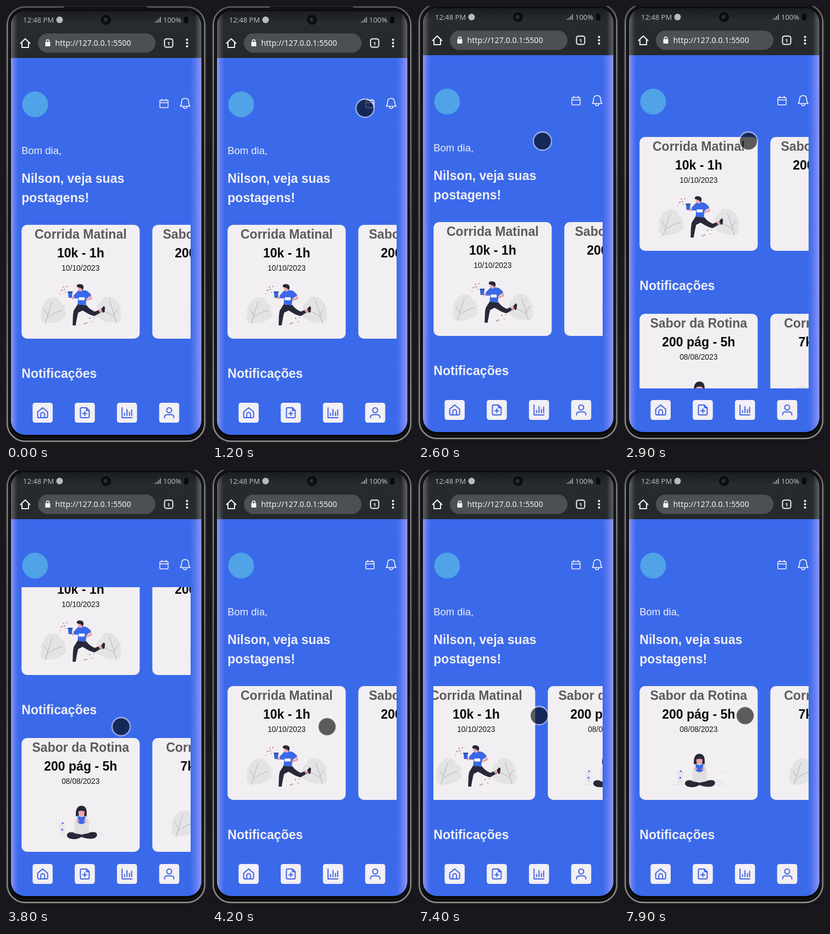
An HTML page for the animation above (8 s loop, 364 by 789 pixels).

```html
<!DOCTYPE html>
<html lang="pt-BR">
<head>
<meta charset="utf-8">
<title>Postagens</title>
<style>
html, body { margin: 0; width: 100%; height: 100%; overflow: hidden; background: #17161c; }
svg { display: block; width: 100vw; height: 100vh; }
text { font-family: "Liberation Sans", Arial, sans-serif; fill: #f2eff2; }
.hi { font-size: 18.45px; }
.big { font-size: 23.05px; font-weight: 700; }
.mid { text-anchor: middle; }
.card .big { fill: #0a0a0a; }
.card .name { fill: #5d5a5c; }
.date { font-size: 13.85px; fill: #161616; }
.ui { font-family: "Noto Sans", "Open Sans", sans-serif; }
.status { font-size: 13px; fill: #b8bbbd; }
.url { font-size: 14.15px; fill: #f4f4f4; }
.line { fill: none; stroke: #f4f1fa; stroke-width: 1.6; stroke-linecap: round; stroke-linejoin: round; }
.nav .line { stroke: #4263e4; stroke-width: 2; }

/* one loop is 8 s, drawn in 100 ms ticks: 1.25% each */
#phone, #page, #row, #touch { animation: 8s step-end infinite; }
#phone { animation-name: drift; }
#page { animation-name: scroll; }
#row { animation-name: swipe; }
#touch { animation-name: touch; }

@keyframes drift {
  0% { transform: translateY(0); }
  27.5% { transform: translateY(-2px); }
  28.75%, 100% { transform: translateY(-5px); }
}
@keyframes scroll {
  0% { transform: translateY(0); }
  35% { transform: translateY(-72px); }
  36.25% { transform: translateY(-154px); }
  37.5% { transform: translateY(-205px); }
  38.75% { transform: translateY(-226px); }
  50% { transform: translateY(-150px); }
  51.25% { transform: translateY(-45px); }
  52.5%, 100% { transform: translateY(0); }
}
@keyframes swipe {
  0% { transform: translateX(0); }
  92.5% { transform: translateX(-30px); }
  93.75% { transform: translateX(-110px); }
  95% { transform: translateX(-185px); }
  96.25% { transform: translateX(-228px); }
  98.75%, 100% { transform: translateX(-238px); }
}
@keyframes touch {
  0% { opacity: 0; transform: translate(61.5px, 46.5px); }
  6.25% { opacity: 1; transform: translate(61.5px, 46.5px); }
  7.5% { opacity: 1; transform: translate(61.5px, 46.5px); animation-timing-function: steps(3, end); }
  11.25% { transform: translate(57.5px, 178px); }
  12.5% { transform: translate(125px, 197px); animation-timing-function: steps(2, end); }
  15% { transform: translate(278.5px, 185px); animation-timing-function: steps(2, end); }
  17.5% { transform: translate(57.5px, 178px); }
  20% { transform: translate(110px, 190px); }
  21.25% { transform: translate(210px, 195px); }
  22.5% { transform: translate(278.5px, 185px); }
  23.75% { transform: translate(230.5px, 193.5px); }
  31.25% { transform: translate(229px, 215px); }
  32.5% { transform: translate(226.5px, 244.5px); }
  36.25% { transform: translate(226.5px, 244.5px); animation-timing-function: steps(7, end); }
  45% { transform: translate(225.5px, 473.5px); }
  47.5% { transform: translate(209.5px, 464.5px); }
  67.5% { transform: translate(222.5px, 435.5px); }
  71.25% { transform: translate(222px, 436px); }
  72.5% { transform: translate(223px, 436.5px); }
  77.5% { transform: translate(221.5px, 446.5px); }
  92.5%, 100% { opacity: 1; transform: translate(220.5px, 444.5px); }
}
</style>
</head>
<body>
<svg viewBox="0 0 364 789" preserveAspectRatio="none">
<defs>
  <linearGradient id="glow">
    <stop offset="0" stop-color="#cdb8ff" stop-opacity=".62"/>
    <stop offset=".35" stop-color="#b5a4ff" stop-opacity=".42"/>
    <stop offset="1" stop-color="#8f8cff" stop-opacity="0"/>
  </linearGradient>
  <linearGradient id="gloss">
    <stop offset="0" stop-color="#b9b9bd" stop-opacity=".4"/>
    <stop offset="1" stop-color="#b9b9bd" stop-opacity="0"/>
  </linearGradient>
  <linearGradient id="bar" x2="0" y2="1">
    <stop offset="0" stop-color="#1b1d1f"/>
    <stop offset=".25" stop-color="#272b2e"/>
    <stop offset="1" stop-color="#24292c"/>
  </linearGradient>
  <linearGradient id="rim" x2="0" y2="1">
    <stop offset="0" stop-color="#58585a"/>
    <stop offset=".05" stop-color="#7c7c7a"/>
    <stop offset=".5" stop-color="#62625f"/>
    <stop offset=".96" stop-color="#83837f"/>
    <stop offset="1" stop-color="#8d8d89"/>
  </linearGradient>
  <clipPath id="screen"><rect x="9" y="9" width="346.5" height="767" rx="26"/></clipPath>
  <clipPath id="view"><rect x="28" y="217.5" width="307.5" height="479"/></clipPath>

  <g id="leaf">
    <path fill="#e4e3e4" d="M4 46C-1 42 0 34 3 30C-2 24 4 18 6 13C10 6 18-1 26 1C33 0 35 7 38 12C46 14 46 22 45 26C50 32 46 39 40 41C30 48 14 50 4 46Z"/>
    <path fill="none" stroke="#a3a2a8" stroke-width=".8" d="M9 49C13 36 17 22 22 9M14 34L7 23M13 38C21 32 29 27 40 25"/>
  </g>

  <g id="runner">
    <use href="#leaf" x="34" y="130"/>
    <use href="#leaf" transform="translate(182 129) scale(-1 1)"/>
    <path fill="#272838" d="M102 144L118 145C121 150 127 154 133 157L144 153L147 157L133 165C126 164 118 159 111 155L103 159C101 167 99.500 175 98.500 182L93 182C93.500 172 93 163 95 155Z"/>
    <path fill="#e9a6ad" d="M140 154.500L144.500 152L147 156L142.500 159Z"/>
    <path fill="#272838" d="M145 152L149.500 147L152 149.500L151 158L148 159Z"/>
    <path fill="none" stroke="#e9a6ad" stroke-width="3.500" stroke-linecap="round" stroke-linejoin="round" d="M99 127L93 133L89 128M123 124L127 133L119 136"/>
    <path fill="#3a68e8" d="M102 120C107 117 115 118 120 120L127 127L122 131L118 134L117 146L102 144L103 133L96 133L94.500 128Z"/>
    <rect x="104" y="131" width="11" height="5.500" rx="1" fill="#f2eff2"/>
    <path fill="#3562e0" d="M84.500 122H92.500L91.500 132H85.500Z"/>
    <path fill="#27468f" d="M84 120.500h9v2h-9z"/>
    <path fill="#e9a6ad" d="M102.500 112H111V119Q107 122 104 119Q102 117 102.500 112Z"/>
    <path fill="#262737" d="M100.500 112C100 107 105 107 108 107.500C114 108 114 115 111 118C109 113 104 114 100.500 112Z"/>
    <g fill="#d98d9d">
      <path d="M71 118l4-1v2l-4 1zM75 112l3-1v2l-3 1zM82 110l2 1-1 2-2-1zM117 176l3 1-1 2-3-1zM128 174l2 2-1 1-2-2z"/>
      <circle cx="70" cy="125" r="1"/><circle cx="131" cy="168" r="1"/>
    </g>
    <g fill="#4c4a7c">
      <circle cx="78" cy="117" r=".9"/><circle cx="80" cy="122" r=".8"/>
      <circle cx="124" cy="169" r=".9"/><circle cx="115" cy="179" r=".9"/>
    </g>
  </g>

  <g id="reader">
    <path stroke="#dddadd" stroke-width=".8" d="M59 178H157"/>
    <path fill="#e9e6e9" d="M67 154h12v22H70zM139 170l4-2 9 9h-4zM146 154h9v2h-9z"/>
    <circle cx="75" cy="154" r="1.8" fill="#7b66e8"/><circle cx="74" cy="166" r="1.8" fill="#5c62e8"/>
    <path fill="#272838" d="M85 172C88 169 98 171 109 175C121 171 132 169 135 171C140 174 137 181 130 182C121 183 114 181 109 179C103 183 96 184 88 182C82 180 81 174 85 172Z"/>
    <path fill="#e2dfe1" d="M102 141C106 138 114 138 118 141C123 147 124 157 122 164L123 172Q109 176 95 172L97 164C95 156 97 147 102 141Z"/>
    <path fill="#262737" d="M99 142C98 132 100 123 109 122.500C119 123 119 132 118.500 142Q109 137 99 142Z"/>
    <path fill="#e9a6ad" d="M103 132Q109 126 115 132L114 139Q109 144 104 139Z"/>
    <path fill="#262737" d="M101 134Q103 126 109 126Q115 126 117 134Q109 129 101 134Z"/>
    <path fill="#3c69e8" d="M102 141L109 143L116 141L115 154L109 156L103 154Z"/>
    <circle cx="102" cy="150" r="2.500" fill="#e9a6ad"/><circle cx="116" cy="150" r="2.500" fill="#e9a6ad"/>
  </g>

  <rect id="sheet" width="215" height="206" rx="10" fill="#f2eff2"/>
  <g id="morning" class="card">
    <use href="#sheet"/><use href="#runner"/>
    <text class="big name mid" x="107.500" y="25">Corrida Matinal</text>
    <text class="big mid" x="107.500" y="59">10k - 1h</text>
    <text class="date mid" x="107.500" y="83.300">10/10/2023</text>
  </g>
  <g id="book" class="card">
    <use href="#sheet"/><use href="#reader"/>
    <text class="big name mid" x="107.500" y="25">Sabor da Rotina</text>
    <text class="big mid" x="107.500" y="59">200 pág - 5h</text>
    <text class="date mid" x="107.500" y="83.300">08/08/2023</text>
  </g>
  <g id="fast" class="card">
    <use href="#sheet"/><use href="#runner"/>
    <text class="big name mid" x="107.500" y="25">Corrida Rápida</text>
    <text class="big mid" x="107.500" y="59">7k - 40min</text>
    <text class="date mid" x="107.500" y="83.300">09/09/2023</text>
  </g>
  <rect id="key" x="-18.300" y="-18" width="36.600" height="36" rx="4.500" fill="#f2eff5"/>
</defs>

<rect width="364" height="789" fill="#17161c"/>

<g id="phone">
  <rect width="364" height="789.500" rx="34" fill="#2c2c2d"/>
  <rect x="2.500" y="2" width="359" height="785.500" rx="32" fill="#08080a" stroke="url(#rim)" stroke-width="2.600"/>
  <rect x="6.500" y="6" width="351" height="776" rx="28" fill="none" stroke="#29292b"/>
  <rect x="105" y="1" width="152" height="2" rx="1" fill="#0d0d0e"/>

  <g clip-path="url(#screen)">
    <rect x="9" y="9" width="347" height="768" fill="#3a69ea"/>
    <rect x="9" y="9" width="347" height="85" fill="url(#bar)"/>
    <rect x="9" y="9" width="12" height="85" fill="url(#gloss)"/>
    <rect x="-355.500" y="9" width="12" height="85" fill="url(#gloss)" transform="scale(-1 1)"/>
    <rect x="9" y="94" width="14" height="683" fill="url(#glow)"/>
    <rect x="-356" y="94" width="21" height="683" fill="url(#glow)" transform="scale(-1 1)"/>
  </g>

  <text class="ui status" x="31" y="29.800">12:48 PM</text>
  <circle cx="97.500" cy="25" r="6" fill="#b8bbbd"/>
  <circle cx="182" cy="25" r="9" fill="#0a0b0c"/>
  <circle cx="181.500" cy="25" r="4.500" fill="#1e2326"/>
  <circle cx="180.500" cy="24" r="1.600" fill="#3a4146"/>
  <path stroke="#b8bbbd" stroke-width="1.500" d="M272 30v-2M275 30v-4M278 30v-7M281 30v-10"/>
  <text class="ui status" x="286" y="29.800">100%</text>
  <path fill="#090a0b" d="M325 20h1.500v-1.500h3V20H331a1 1 0 0 1 1 1v9a1 1 0 0 1-1 1h-6a1 1 0 0 1-1-1v-9a1 1 0 0 1 1-1z"/>

  <path class="line" style="stroke-width:2" d="M26.500 67.500L35 59.300L43.500 67.500M29 66V75H41V66"/>
  <rect x="58" y="49.500" width="214" height="35" rx="17.500" fill="#4c5054"/>
  <rect x="71.500" y="65" width="9" height="8" rx="1" fill="#f4f4f4"/>
  <path class="line" d="M73.500 65V63.500a2.500 2.500 0 0 1 5 0V65"/>
  <text class="ui url" x="89.500" y="72">http://127.0.0.1:5500</text>
  <rect x="288.500" y="59.500" width="15" height="15" rx="3.500" class="line" style="stroke-width:1.900"/>
  <text class="ui mid" x="296" y="70.500" style="font-size:9.500px;font-weight:700">1</text>
  <g fill="#f4f4f4"><circle cx="329.500" cy="61" r="2"/><circle cx="329.500" cy="67" r="2"/><circle cx="329.500" cy="73" r="2"/></g>

  <circle cx="53" cy="178" r="23.500" fill="#4fa3e6"/>
  <g class="line">
    <path style="stroke-width:1.500" d="M282 170.500H293a2 2 0 0 1 2 2V182a2 2 0 0 1-2 2H282a2 2 0 0 1-2-2V172.500a2 2 0 0 1 2-2ZM280 175H295M283.500 168.500V171.500M291.500 168.500V171.500"/>
    <path d="M319.500 174.500C319.500 169.500 322 167 326 167S332.500 169.500 332.500 174.500C332.500 178.500 333.500 180 335 181.500H317C318.500 180 319.500 178.500 319.500 174.500ZM323 182.500a3 3 0 0 0 6 0"/>
  </g>

  <g clip-path="url(#view)">
    <g id="page">
      <text class="hi" x="28.300" y="268">Bom dia,</text>
      <text class="big" x="28.300" y="320">Nilson, veja suas</text>
      <text class="big" x="28.300" y="355">postagens!</text>
      <g id="row">
        <use href="#morning" x="28.300" y="396"/>
        <use href="#book" x="266.300" y="396"/>
        <use href="#fast" x="504.300" y="396"/>
      </g>
      <text class="big" x="28.300" y="673">Notificações</text>
      <use href="#book" x="28.300" y="716"/>
      <use href="#fast" x="266.300" y="716"/>
    </g>
  </g>

  <g class="nav">
    <g transform="translate(66.700 736)">
      <use href="#key"/>
      <path class="line" d="M-9-1.500L0-9L9-1.500V7a2 2 0 0 1-2 2H-7a2 2 0 0 1-2-2ZM-3.500 9V3a3.500 3.500 0 0 1 7 0V9"/>
    </g>
    <g transform="translate(143.400 736)">
      <use href="#key"/>
      <path class="line" d="M-6-9H3L8-4V7a2 2 0 0 1-2 2H-6a2 2 0 0 1-2-2V-7a2 2 0 0 1 2-2ZM3-9V-4H8M0-2V5M-3.500 1.500H3.500"/>
    </g>
    <g transform="translate(220.200 736)">
      <use href="#key"/>
      <path class="line" d="M-9-9V9H9M-4.500 5V1M0 5V-6M4.500 5V-1M8.500 5V-5"/>
    </g>
    <g transform="translate(297 736)">
      <use href="#key"/>
      <circle class="line" cy="-4.500" r="4.500"/>
      <path class="line" d="M-8.500 9V8a4.500 4.500 0 0 1 4.500-4.500H4A4.500 4.500 0 0 1 8.500 8V9"/>
    </g>
  </g>
</g>

<g id="touch">
  <circle r="16" fill="#000" fill-opacity=".62"/>
  <circle r="16.500" fill="none" stroke="#fff" stroke-opacity=".68" stroke-width="1.800"/>
</g>
</svg>
</body>
</html>
```
